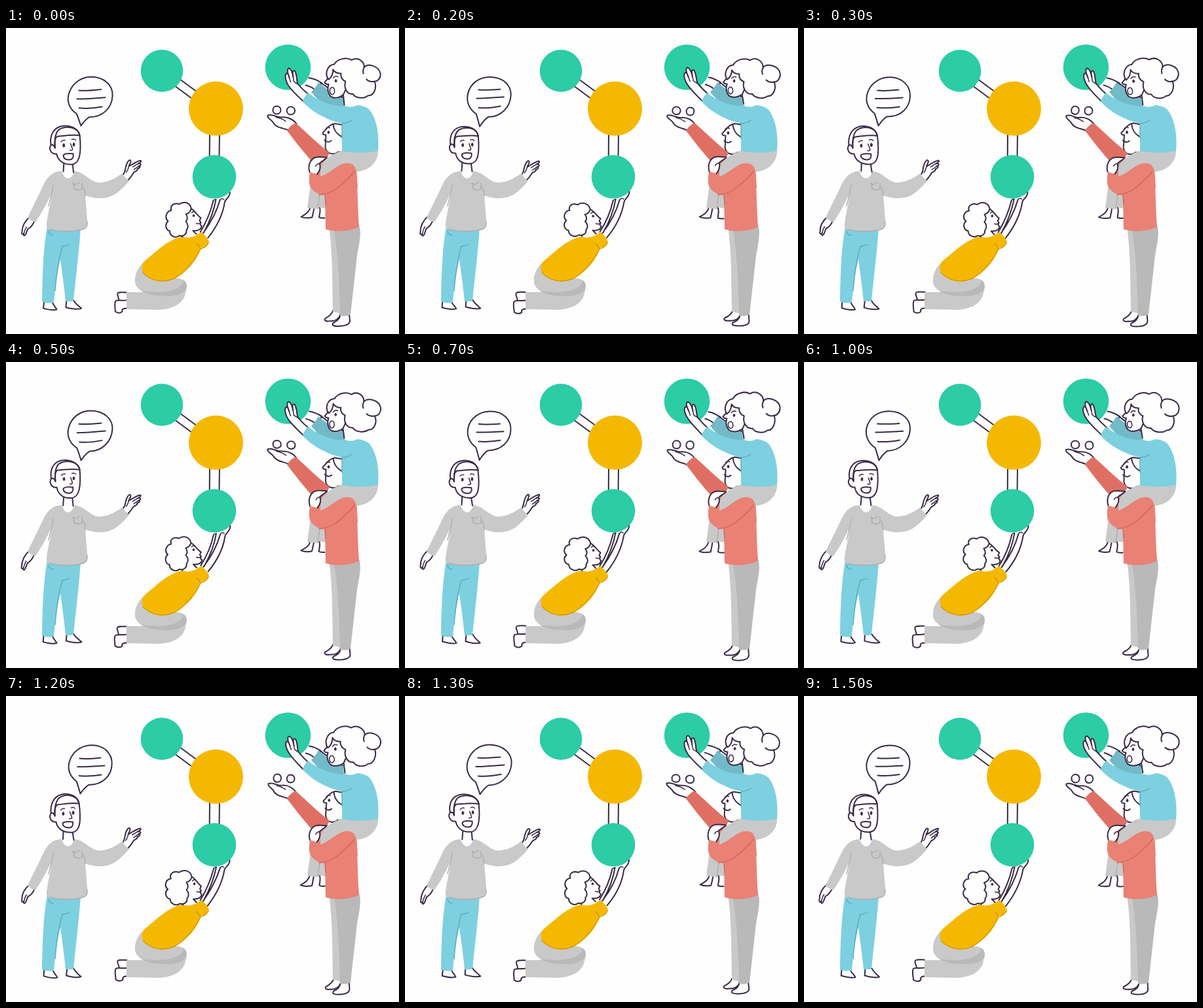
An HTML page that plays this animation: 600 px wide and 468 px high, repeating every 1.7 s.

```html
<!DOCTYPE html>
<html lang="en">
<head>
<meta charset="utf-8">
<title>Building a molecule together</title>
<style>
  html, body { margin: 0; width: 100%; height: 100%; overflow: hidden; background: #fefefe; }
  svg { display: block; width: 100vw; height: 100vh; }
  .ink, .skin, .rigid { fill: none; stroke: #392b47; stroke-width: 2; stroke-linecap: round; stroke-linejoin: round; }
  .skin, .paper { fill: #fefefe; }
  .dot { fill: #392b47; stroke-width: 1; }
  .fine { stroke-width: 1.5; }
  .fold { fill: none; stroke-width: 1.4; stroke-linecap: round; }
  .green { fill: #2ccca5; }
  .yellow { fill: #f5b800; }
  .blue { fill: #7dd0e0; }
  .shade-blue { fill: #72bac8; }
  .gray { fill: #c9c9c9; }
  .shade-gray { fill: #b9b9b9; }
  .red { fill: #e06f63; }
  .salmon { fill: #ea8175; }
</style>
</head>
<body>
<svg viewBox="0 0 600 468">
  <!-- molecule -->
  <path class="rigid" d="M265 78 L292 98 M257 88 L284 108 M311 160 L310.7 200 M326 160 L325.500 200"/>
  <circle class="green" cx="238" cy="65.500" r="32.300"/>
  <circle class="yellow" cx="320.500" cy="123.300" r="41.500"/>
  <circle class="green" cx="318" cy="227.500" r="33.300"/>
  <circle class="green" cx="430.500" cy="60" r="34.800"/>

  <!-- speech bubble -->
  <path class="skin" d="M108 131 C98 124 93 113 96 101 C100 85 114 75 130 75 C150 75 163 88 162 104 C161 122 147 136 127 136 C122 139 118 144 114 150 C112 143 110 136 108 131 Z"/>
  <path class="ink" d="M112 95 C122 96 134 95 145 94 M109 108 C122 108 138 107 151 106 M112 122 C122 123 135 122 146 120"/>

  <!-- speaker -->
  <path class="skin" d="M58 417 L57 428 C64 430 72 432 78 430 C76 426 73 424 71 419"/>
  <path class="skin" d="M93 416 L92 427 C98 429 109 431 115 429 C111 425 106 422 103 416"/>
  <path class="blue" d="M63 304 C58 332 56 360 55 418 C61 421 67 421 73 420 C75 396 78 374 83 354 C86 376 89 398 91 418 L103 418 C106 386 111 348 114 306 Z"/>
  <path class="fold" stroke="#5fa9b8" d="M75 402 C77 376 80 354 86 334 C90 333 94 333 97 331 M65 311 C66 315 69 317 72 317"/>
  <path class="skin" d="M36 288 C29 294 24 303 24 312 C23 315 25 317 27 314 C26 318 28 319 30 315 L33 307 C37 305 41 300 43 295"/>
  <path class="ink fine" d="M27 314 C28 310 29 307 31 304"/>
  <path class="skin" d="M178 225 C183 219 181 214 184 208 C186 203 189 201 190 204 C190 207 188 209 187 212 C193 209 199 204 205 203 C207 204 204 207 201 208 C206 207 207 210 202 212 C206 212 204 215 200 216 C202 217 198 220 195 221 C192 226 189 230 185 234"/>
  <path class="ink fine" d="M187 212 C186 216 185 219 183 221 M201 208 L193 213 M202 212 L195 217"/>
  <path class="gray" d="M85 219 C72 219 64 227 58 238 C50 256 41 273 33 290 C36 293 40 296 45 297 C55 282 63 267 70 252 C68 270 64 283 62 299 C61 307 64 308 70 309 C85 312 102 312 116 309 C124 307 125 302 124 293 L121 256 C138 263 158 262 171 251 C177 246 183 240 188 234 C184 231 180 227 178 222 C164 232 150 238 138 236 C124 231 118 219 103 219 Z"/>
  <path class="fold" stroke="#adadad" d="M72 240 C71 251 67 263 65 272 M121 257 C121 252 120 247 118 243 M103 237 L104 246 C108 248 113 248 116 246 L116 237 M102 238 C106 240 109 239 112 236 M67 308 C83 312 103 312 117 308 C124 306 124 302 124 296"/>
  <path class="paper" d="M87 204 L85 219 C87 226 91 230 95 230 C99 230 103 225 104 219 L101 204 Z"/>
  <path class="ink" d="M88 203 L87 219 M101 205 L103 220"/>
  <path class="skin" d="M75 183 C74 174 75 162 81 156 C92 149 109 152 112 164 C113 174 114 185 112 195 C110 205 104 209 97 208 C88 208 79 203 77 192 C69 193 65 184 69 179 C71 177 74 179 75 183 Z"/>
  <path class="ink" d="M69 179 C67 166 72 154 84 151 C98 148 110 154 112 165 M75 183 C75 174 74 168 79 166 C91 165 102 163 112 165"/>
  <path class="ink fine" d="M98 177 C99 180 101 184 101 186 C100 188 98 187 97 187 M84 174 C86 172 88 171 90 172 M100 171 C102 170 104 170 106 172"/>
  <path class="ink dot" d="M88 177 C90 177 90 182 88 182 C86 182 86 177 88 177 Z M103 176 C105 176 105 181 103 181 C101 181 101 176 103 176 Z"/>
  <path class="skin" d="M87 194 C90 190 97 192 102 192 C103 197 101 201 96 201 C91 201 87 199 87 194 Z"/>

  <!-- kneeling helper -->
  <path class="skin" d="M184 404 C177 404 171 403 170 406 C169 409 173 413 172 417 L185 417"/>
  <path class="skin" d="M185 416 C177 418 169 415 167 418 C165 423 167 429 167 434 C170 437 176 437 178 434 C177 430 180 429 185 429"/>
  <path class="gray" d="M212 357 C200 366 196 379 197 389 C198 396 204 401 210 404 L184 404 L184 430 L233 431 C258 430 272 419 274 405 C276 399 277 392 274 388 C270 384 265 383 258 382 Z"/>
  <path class="shade-gray" d="M206 402 C226 405 249 405 261 398 C268 394 272 389 270 385 C275 388 277 394 275 399 C270 408 256 411 241 410 C227 410 214 407 206 402 Z"/>
  <path class="ink" d="M297 312 C305 299 313 282 317 264 M302 313 C311 297 318 279 321 262 M301 314 C312 299 322 281 327 263 M308 321 C321 305 331 285 334 266 C335 261 342 259 342 251"/>
  <path class="ink fine" d="M317 264 C318 262 320 262 321 262 M327 263 C329 260 331 260 333 262"/>
  <path class="yellow" d="M269 319 C280 323 290 318 298 312 C303 316 308 321 310 327 C309 333 304 336 298 336 C293 353 277 373 258 383 C242 391 222 389 210 375 C206 370 207 362 211 357 C231 340 250 322 269 319 Z"/>
  <path class="fold" stroke="#d39b00" d="M209 374 C222 388 241 390 257 383 C274 374 289 354 297 338 C302 337 307 333 309 329 M297 338 C295 334 293 331 291 330"/>
  <path class="paper" d="M270 319 C278 322 287 318 291 315 L285 305 L265 300 Z"/>
  <path class="skin" d="M270 319 L265 295 L282 276 C289 280 293 288 298 291 L296 295 L298 298 C296 300 297 302 299 303 C299 307 295 311 286 310 L291 315"/>
  <path class="skin" d="M283 277 C281 267 271 265 264 270 C256 267 249 272 252 279 C244 280 241 290 247 295 C241 300 244 309 250 310 C250 317 259 322 265 317 C271 319 277 315 276 309 C280 305 278 299 275 296 C279 292 277 288 275 285 C279 284 282 281 283 277 Z"/>
  <path class="ink fine" d="M291 299 C293 300 296 300 298 298 M284 283 C286 281 288 281 289 282"/>
  <path class="ink dot" d="M287 286 C289 286 289 289 287 289 C285 289 285 286 287 286 Z"/>

  <!-- carrier: legs and raised hand -->
  <path class="skin" d="M500 432 C498 439 492 442 488 444 C485 447 490 449 495 448 C503 449 509 445 511 439"/>
  <path class="skin" d="M511 438 C510 447 504 449 500 451 C497 455 502 456 508 456 C519 456 525 453 525 448 L524 437"/>
  <path class="gray" d="M493 303 L520 303 L511 440 L509 436 L499 434 C498 390 499 345 493 303 Z"/>
  <path class="shade-gray" d="M500 304 L538 299 C544 312 539 330 536 348 L526 438 C521 441 515 441 510 440 C509 400 508 348 500 304 Z"/>
  <path class="skin" d="M443 147 C437 139 428 136 420 137 C412 137 407 131 400 134 C399 138 405 140 408 144 C412 153 424 153 432 157"/>
  <path class="ink fine" d="M413 137 C418 138 423 140 427 143"/>
  <path class="skin" d="M414 120 C422 120 422 132 414 132 C406 132 406 120 414 120 Z M435 121 C443 121 443 133 435 133 C427 133 427 121 435 121 Z"/>

  <!-- dangling legs -->
  <path class="skin" d="M464 275 C462 283 455 286 450 289 C455 291 462 291 467 290 C468 286 469 281 470 275"/>
  <path class="skin" d="M478 273 C481 281 478 286 478 290 C481 292 485 291 487 291"/>
  <path class="gray" d="M465 238 L488 244 L488 276 L478 274 L476 277 L460 275 Z"/>
  <path class="fold" stroke="#adadad" d="M476 276 L479 254"/>

  <!-- carrier: head and shirt -->
  <path class="skin" d="M503 146 C494 147 490 155 484 161 C484 164 487 164 489 164 L488 183 C490 194 501 195 507 190 L518 190 L515 148 Z"/>
  <path class="ink" d="M500 147 C501 157 507 164 514 167 M487 172 C490 175 494 176 497 173"/>
  <path class="ink fine" d="M489 154 C491 152 493 152 495 153"/>
  <path class="ink dot" d="M493 158 C495 158 495 162 493 162 C491 162 491 158 493 158 Z"/>
  <path class="red" d="M429 157 C432 152 436 148 442 145 C459 160 476 177 494 191 L484 212 L466 203 C453 188 441 173 429 157 Z"/>
  <path class="salmon" d="M534 205 C537 225 536 267 539 304 C524 312 502 312 488 308 L487 256 C475 255 464 247 463 237 C462 226 465 213 469 204 L490 206 Z"/>
  <path class="gray" d="M480 217 C479 207 491 195 514 187 L568 187 C569 203 556 219 534 220 C533 213 529 208 523 207 C506 206 496 223 480 228 Z"/>
  <path class="salmon" d="M474 229 C495 225 506 205 524 207 C533 208 535 216 536 228 L537 245 C525 235 500 262 476 253 C468 247 468 238 474 229 Z"/>
  <path class="fold" stroke="#d0655a" d="M478 255 C495 254 506 246 519 233 C524 229 529 223 532 219 M487 256 L488 270"/>
  <path class="skin" d="M464 220 C461 210 465 201 472 198 C478 196 485 198 490 198 C487 202 482 203 479 207 C481 212 479 218 475 223"/>
  <path class="ink fine" d="M479 207 C476 207 474 209 473 211"/>

  <!-- rider -->
  <path class="skin" d="M463 76 C470 77 476 80 482 84 L472 94 C468 91 463 88 458 87"/>
  <path class="shade-blue" d="M477 83 C474 89 470 94 466 98 L490 125 L518 126 L518 109 C502 102 490 94 477 83 Z"/>
  <path class="ink" d="M480 83 C491 92 503 100 516 107"/>
  <path class="skin" d="M455 113 C447 105 438 97 432 88 C427 81 425 72 428 69 C431 68 432 73 433 76 C430 69 428 62 432 61 C436 62 438 70 439 75 C438 69 437 64 441 65 C445 70 444 80 446 85 C452 92 457 97 463 102"/>
  <path class="ink fine" d="M433 76 L435 82 M439 75 L440 81 M446 85 C443 84 441 82 440 81"/>
  <path class="blue" d="M461 99 C457 103 454 108 453 113 C469 130 493 142 513 146 L513 188 C529 192 553 191 568 188 C570 166 567 140 555 125 C547 117 531 117 519 119 C500 121 479 113 461 99 Z"/>
  <path class="fold" stroke="#5fa9b8" d="M513 147 L513 169 M513 146 C519 146 524 144 528 141"/>
  <path class="paper" d="M514 101 L516 118 C522 122 531 121 536 118 L535 100 Z"/>
  <path class="skin" d="M499 62 C496 70 492 77 486 83 C487 86 490 86 492 86 C490 92 491 99 495 104 C502 109 511 105 515 102 L517 117 L515 102 L532 65 Z"/>
  <path class="skin" d="M492 79 C486 71 490 57 501 56 C505 48 519 44 527 49 C537 43 547 51 547 60 C553 53 570 58 572 69 C573 78 567 82 563 82 C567 92 562 104 553 104 C547 109 534 108 530 101 C521 102 515 92 518 82 C512 80 510 74 511 70 C506 70 501 68 499 64 C499 71 496 76 492 79 Z"/>
  <path class="ink" d="M547 60 C545 64 545 67 546 70 M563 82 C559 83 554 82 551 79"/>
  <path class="ink fine" d="M499 77 C501 74 504 74 506 75"/>
  <path class="ink dot" d="M503 79 C505 79 505 83 503 83 C501 83 501 79 503 79 Z"/>
  <path class="skin fine" d="M496 91 C501 89 503 98 499 101 C494 103 492 94 496 91 Z"/>
</svg>
<script>
  const LOOP = 1700;
  const POSE_STARTS = [0, 200, 300, 500, 700, 800, 1000, 1200, 1300, 1500];
  const WOBBLE = 0.6;

  const strokes = [...document.querySelectorAll('.ink, .skin')]
    .map(path => ({ path, shape: path.getAttribute('d') }));

  // A smooth displacement field keeps neighbouring lines joined in every pose.
  function wobble(shape, pose) {
    return shape.replace(/([\d.]+) ([\d.]+)/g, (_, a, b) => {
      const x = +a, y = +b;
      const dx = WOBBLE * Math.sin(x / 17 + y / 23 + pose * 2.4);
      const dy = WOBBLE * Math.sin(y / 19 - x / 29 + pose * 3.7);
      return `${(x + dx).toFixed(2)} ${(y + dy).toFixed(2)}`;
    });
  }

  let shownPose = -1;
  function draw() {
    const time = performance.now() % LOOP;
    const pose = POSE_STARTS.filter(start => start <= time).length - 1;
    if (pose !== shownPose) {
      for (const { path, shape } of strokes) path.setAttribute('d', wobble(shape, pose));
      shownPose = pose;
    }
    requestAnimationFrame(draw);
  }
  draw();
</script>
</body>
</html>
```
